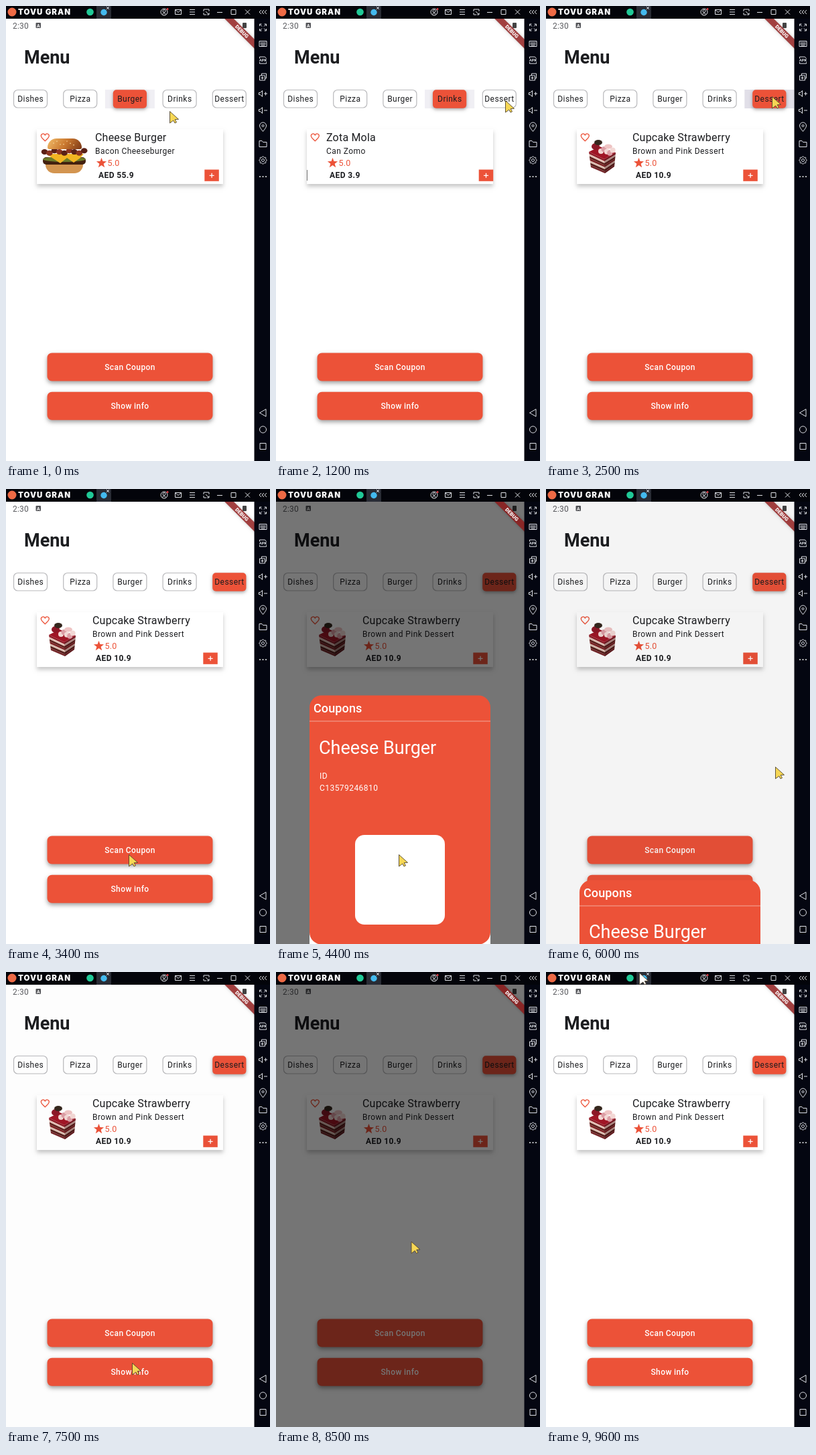
These frames come from a looping animation (394 px wide and 680 px high, 10 s). An HTML page with a canvas:

```html
<!DOCTYPE html>
<html lang="en">
<head>
<meta charset="utf-8">
<title>Menu</title>
<style>
html, body { margin: 0; width: 100%; height: 100%; overflow: hidden; background: #fff; }
canvas { display: block; width: 394px; height: 680px; }
</style>
</head>
<body>
<canvas id="stage"></canvas>
<script>
const W = 394, H = 680, LOOP = 10000, STEP = 100;
const RED = '#ec5238', INK = '#1c1d20', PALE = '#dfe1e6';
const canvas = document.getElementById('stage');
const ratio = window.devicePixelRatio || 1;
canvas.width = W * ratio;
canvas.height = H * ratio;
const ctx = canvas.getContext('2d');

const CHIPS = ['Dishes', 'Pizza', 'Burger', 'Drinks', 'Dessert'];
const ITEMS = {
  2: { title: 'Cheese Burger', sub: 'Bacon Cheeseburger', price: '55.9', x: 133, plus: 296.3, photo: burger },
  3: { title: 'Zota Mola', sub: 'Can Zomo', price: '3.9', x: 75, plus: 302.7, photo: emptyPhoto },
  4: { title: 'Cupcake Strawberry', sub: 'Brown and Pink Dessert', price: '10.9', x: 129, plus: 294.3, photo: cake }
};
// time, selected chip
const TAPS = [[-200, 2], [1000, 3], [2500, 4]];
// time, x, y of the pointer tip
const PATH = [
  [0, 245, 158], [100, 245, 158], [700, 250, 145], [900, 250, 145], [1200, 343, 142],
  [1400, 341, 140], [1800, 341, 140], [2100, 338, 136], [2500, 338, 136], [3300, 184, 547],
  [5000, 184, 547], [5700, 343, 416], [6100, 343, 416], [7100, 189, 585], [7500, 189, 585],
  [8200, 202, 403], [8400, 202, 403], [8600, 203, 404], [8800, 203, 404], [9600, 140, 2], [LOOP, 140, 2]
];

const clamp = v => Math.max(0, Math.min(1, v));
const smooth = v => v * v * (3 - 2 * v);

function text(s, x, y, size, color = INK, weight = 400, spacing = 0.45, align = 'left') {
  ctx.font = `${weight} ${size}px Roboto, sans-serif`;
  ctx.letterSpacing = spacing + 'px';
  ctx.textAlign = align;
  ctx.fillStyle = color;
  ctx.fillText(s, x, y);
}

function box(x, y, w, h, r, fill) {
  ctx.beginPath();
  ctx.roundRect(x, y, w, h, r);
  ctx.fillStyle = fill;
  ctx.fill();
}

function shadowed(alpha, blur, dy, draw) {
  ctx.save();
  ctx.shadowColor = `rgba(0,0,0,${alpha})`;
  ctx.shadowBlur = blur * ratio;
  ctx.shadowOffsetY = dy * ratio;
  draw();
  ctx.restore();
}

function poly(points, fill) {
  ctx.beginPath();
  points.forEach(([x, y]) => ctx.lineTo(x, y));
  ctx.closePath();
  ctx.fillStyle = fill;
  ctx.fill();
}

function disc(x, y, rx, ry, fill) {
  ctx.beginPath();
  ctx.ellipse(x, y, rx, ry, 0, 0, Math.PI * 2);
  ctx.fillStyle = fill;
  ctx.fill();
}

// Points of a closed outline whose radius depends on the angle.
function ring(x, y, count, radius) {
  return Array.from({ length: count }, (_, i) => {
    const a = i / count * Math.PI * 2 - Math.PI / 2, r = radius(a, i);
    return [x + r * Math.cos(a), y + r * Math.sin(a)];
  });
}

// Strokes an icon given as a path around (x, y).
function icon(x, y, d, color = PALE, width = 1) {
  ctx.save();
  ctx.translate(x, y);
  ctx.strokeStyle = color;
  ctx.lineWidth = width;
  ctx.stroke(new Path2D(d));
  ctx.restore();
}

function burger() {
  const bun = ctx.createLinearGradient(68, 199, 104, 222);
  bun.addColorStop(0, '#e9ad5c');
  bun.addColorStop(0.5, '#c9772f');
  bun.addColorStop(1, '#85401a');
  box(59, 232, 56, 18, [4, 4, 13, 13], '#d39550');
  box(55, 226, 64, 11, 5, '#43210f');
  disc(87, 229, 32, 4, '#6d7c2a');
  poly([[60, 221], [116, 221], [111, 227], [101, 234], [91, 227], [81, 235], [69, 227]], '#f2b422');
  for (let i = 0; i < 9; i++) {
    disc(57.5 + i * 7.4, 218 + Math.sin(i * 2.1) * 2, 4.8, 4, i % 2 ? '#8c3421' : '#5a2016');
  }
  box(62, 198, 51, 16, [24, 24, 5, 5], bun);
  for (let i = 0; i < 7; i++) disc(71 + i * 5, 205 - 3 * Math.sin(i * 1.9), 1, 0.7, '#f3d59b');
}

function cake() {
  const lerp = (a, b, k) => a + (b - a) * k;
  const colors = ['#8f1c27', '#e3c1b6', '#5e201c', '#7d2325', '#dbbdb0', '#541c18', '#75272a'];
  const edge = k => [[lerp(64, 67, k), lerp(218, 241, k)], [lerp(87, 88, k), lerp(229, 250, k)],
                     [lerp(104, 102, k), lerp(219, 240, k)]];
  colors.forEach((c, i) => {
    poly([...edge(i / colors.length), ...edge((i + 1) / colors.length).reverse()], c);
  });
  poly([[87, 229], [104, 219], [102, 240], [88, 250]], 'rgba(50,8,10,0.3)');
  poly([[64, 218], [80, 210], [104, 219], [87, 229]], '#a01626');
  for (let i = 0; i < 5; i++) {
    disc(82 + i * 4.4, 217 - 3 * Math.sin(i * 1.7), 4, 4, i % 2 ? '#dc9da4' : '#f3d8d5');
  }
  disc(93, 210, 6, 3.5, '#efc4c4');
  disc(74, 210, 6, 5, '#8d1827');
  disc(78, 204, 6, 4, '#35271d');
}

function emptyPhoto() {
  box(46, 245, 1, 16, 0, '#777');
}

function drawChips(active, glow) {
  CHIPS.forEach((label, i) => {
    const cx = 36.5 + i * 74.2, x = cx - 25.5;
    if (i === active) {
      box(cx - 37, 125, 74, 28, 0, `rgba(70,60,110,${0.08 * glow})`);
      shadowed(0.35, 5, 2, () => box(x + 0.4, 125.3, 50.2, 27.4, 5, RED));
    } else {
      ctx.beginPath();
      ctx.roundRect(x + 0.5, 125.5, 50, 26.5, 6);
      ctx.strokeStyle = '#b9b9bc';
      ctx.lineWidth = 1.2;
      ctx.stroke();
    }
    text(label, cx + 0.2, 143, 12, INK, 400, 0.45, 'center');
  });
}

function drawCard(item) {
  shadowed(0.22, 6, 3.5, () => box(46, 184, 278, 82, 0, '#fff'));
  item.photo();
  icon(58.3, 196.5, 'M0 5.3C-4 1.8-6-.1-6-2.4C-6-6-1.7-6.6 0-3.6C1.7-6.6 6-6 6-2.4C6-.1 4 1.8 0 5.3Z', RED, 1.3);
  text(item.title, item.x, 201.5, 16, INK, 400, 0.2);
  text(item.sub, item.x, 220.5, 12);
  poly(ring(item.x + 9.5, 234.7, 10, (a, i) => i % 2 ? 3.3 : 8), RED);
  text('5.0', item.x + 18.5, 239, 12.5, RED, 400, 0.2);
  text('AED ' + item.price, item.x + 5, 257, 12, INK, 700, 0.4);
  box(item.plus, 244.5, 21.5, 17.3, 0, RED);
  icon(item.plus + 10.8, 253.3, 'M-3.5 0H3.5M0-3.5V3.5', '#fff', 1.3);
}

function drawButton(label, y) {
  shadowed(0.38, 6, 3, () => box(61.5, y, 247, 42, 7, RED));
  text(label, 185, y + 25.5, 12, '#fff', 500, 0.4, 'center');
}

function drawPage(t) {
  const [since, active] = TAPS.filter(tap => tap[0] <= t).pop();
  box(0, 19, 371, 661, 0, '#fff');
  text('2:30', 10, 33.5, 12, '#5b5c60', 400, 0.2);
  box(44.5, 25, 7.5, 8, 1, '#55565a');
  text('A', 48.3, 32, 7, '#fff', 700, 0, 'center');
  box(353, 25, 6, 8, 1, '#444');
  text('Menu', 27, 86.4, 27, INK, 700, 0);
  drawChips(active, clamp(1 - (t - since) / 400) * 2);
  drawCard(ITEMS[active]);
  drawButton('Scan Coupon', 518.5);
  drawButton('Show info', 576.8);
}

function drawSheet(y) {
  box(50, y + 60, 270, 312, 0, '#fff');
  box(50, y, 270, 372, 18, RED);
  text('Coupons', 56, y + 25.3, 18, '#fff', 500, 0.1);
  box(50, y + 38, 270, 1, 0, '#f3a99b');
  text('Cheese Burger', 64, y + 87, 27, '#fff', 400, 0);
  text('ID', 65, y + 124, 12, '#fff');
  text('C13579246810', 65, y + 142, 12, '#fff');
  box(118, y + 208.5, 134, 134, 14, '#fff');
}

function drawBanner() {
  ctx.save();
  ctx.beginPath();
  ctx.rect(0, 19, 371, 661);
  ctx.clip();
  ctx.translate(371, 19);
  ctx.rotate(Math.PI / 4);
  shadowed(0.5, 5, 0, () => box(-40, 22, 80, 9.6, 0, 'rgba(0,0,0,0.4)'));
  box(-40, 22, 80, 9.6, 0, 'rgba(183,28,28,0.63)');
  text('DEBUG', 0, 29.4, 7.6, '#fff', 900, 0, 'center');
  ctx.restore();
}

function drawFrame() {
  box(370.5, 0, 23.5, H, 0, '#040611');
  box(0, 0, W, 19, 0, '#03040a');
  disc(9, 9, 6.5, 6.5, '#ee6a45');
  ctx.font = '900 11.5px Inter, sans-serif';
  ctx.letterSpacing = '1px';
  ctx.textAlign = 'left';
  ctx.fillStyle = '#fff';
  ctx.fillText('TOVU GRAN', 18, 13.2);
  disc(125.5, 9, 5.3, 5.3, '#20c997');
  box(135, 0, 22, 19, 0, '#292c35');
  disc(146, 9.5, 4.7, 4.7, '#43b9ee');
  icon(152, 3, 'M-2-2L2 2M2-2L-2 2');

  icon(236, 9, 'M5 0A5 5 0 1 1-5 0A5 5 0 1 1 5 0M2-1.5A2 2 0 1 1-2-1.5A2 2 0 1 1 2-1.5M-3 3.5Q0 0 3 3.5');
  disc(241, 4.5, 1.5, 1.5, '#e43b44');
  icon(257, 9, 'M-4.5-3.5H4.5V3.5H-4.5ZM-4.5-3.5L0 .5L4.5-3.5');
  icon(278, 9, 'M-4-3.5H4M-4 0H4M-4 3.5H4');
  icon(299, 9, 'M-4-1V-4H4V-1M-4 1V4H0M-1-1L4 4M4 1V4H1');
  icon(319, 9, 'M-4 .5H4');
  icon(339.5, 9, 'M-3.5-3.5H3.5V3.5H-3.5Z');
  icon(360.5, 9, 'M-3.5-3.5L3.5 3.5M3.5-3.5L-3.5 3.5');
  icon(383.5, 9, 'M-2.5-3L-5.5 0L-2.5 3M1.5-3L-1.5 0L1.5 3M5.5-3L2.5 0L5.5 3');

  const x = 383.5;
  icon(x, 32, 'M-5-2V-5H-2M2-5H5V-2M5 2V5H2M-2 5H-5V2M-5-5L-1.5-1.5M5-5L1.5-1.5M5 5L1.5 1.5M-5 5L-1.5 1.5');
  icon(x, 56.5, 'M-5.5-4H5.5V4H-5.5ZM-4-1.5H4M-4 .5H4M-3 2.5H3');
  icon(x, 81, 'M-5-2.5V-5H3L5-2.5M-5 3V5H5V3');
  text('APK', x, 83.4, 6, PALE, 700, 0, 'center');
  icon(x, 106, 'M-5-2H3V5H-5ZM-2-2V-5H5V2H3M-1-.5V3.5M-3 1.5H1');
  const speaker = 'M-6-1.5H-4L-1-4.5V4.5L-4 1.5H-6Z';
  icon(x, 131, speaker + 'M1.5 0H6.5M4-2.5V2.5');
  icon(x, 156, speaker + 'M1.5 0H6.5');
  icon(x, 181, 'M0 6.5C-3 2.5-5 .5-5-2A5 5 0 0 1 5-2C5 .5 3 2.5 0 6.5ZM1.5-2A1.5 1.5 0 1 1-1.5-2A1.5 1.5 0 1 1 1.5-2');
  icon(x, 206, 'M-5.5 4.5V-4.5H-1.5L0-2.5H5.5V4.5Z');
  const gear = ring(0, 0, 48, a => 5.1 + 0.7 * Math.cos(8 * a));
  icon(x, 230.5, 'M' + gear.join('L') + 'ZM2 0A2 2 0 1 1-2 0A2 2 0 1 1 2 0');
  [-4.5, 0, 4.5].forEach(d => disc(x + d, 255, 1.1, 1.1, PALE));
  icon(x, 608, 'M4.5-5.5V5.5L-5 0Z');
  icon(x, 633, 'M5 0A5 5 0 1 1-5 0A5 5 0 1 1 5 0');
  icon(x, 658, 'M-4.5-4.5H4.5V4.5H-4.5Z');
}

function drawPointer(t) {
  const i = Math.max(1, PATH.findIndex(p => p[0] >= t));
  const [t0, x0, y0] = PATH[i - 1], [t1, x1, y1] = PATH[i];
  const k = smooth(clamp((t - t0) / (t1 - t0)));
  const x = x0 + (x1 - x0) * k, y = y0 + (y1 - y0) * k;
  ctx.save();
  ctx.translate(x - 1, y - 1);
  const arrow = new Path2D('M.5.5L13.5 12.3L8.2 12.6L10.5 16.8L8 18L5.8 14L.5 18Z');
  ctx.fillStyle = y < 19 ? '#fff' : '#f6d755';
  ctx.fill(arrow);
  ctx.strokeStyle = '#51452f';
  ctx.lineWidth = 0.9;
  ctx.stroke(arrow);
  ctx.restore();
}

// How far the coupon sheet is open, 0 to 1.
const sheetOpen = t => t < 4400 ? 0 : clamp(1 - (t - 5820) / 200);

function infoDim(t) {
  const shown = clamp((t - 7400) / 300), hidden = clamp((t - 8750) / 250);
  return Math.pow(smooth(shown), 3) * (1 - smooth(hidden));
}

function draw(t) {
  ctx.setTransform(ratio, 0, 0, ratio, 0, 0);
  drawPage(t);
  const open = sheetOpen(t);
  const dim = 0.54 * Math.max(Math.pow(open, 1.08), infoDim(t));
  box(0, 19, 371, 661, 0, `rgba(0,0,0,${dim})`);
  if (open > 0) drawSheet(680.5 - 372 * Math.pow(open, 0.588));
  drawBanner();
  drawFrame();
  drawPointer(t);
}

const start = performance.now();
function tick() {
  const t = (performance.now() - start) % LOOP;
  draw(Math.floor(t / STEP) * STEP);
  requestAnimationFrame(tick);
}
tick();
</script>
</body>
</html>
```
